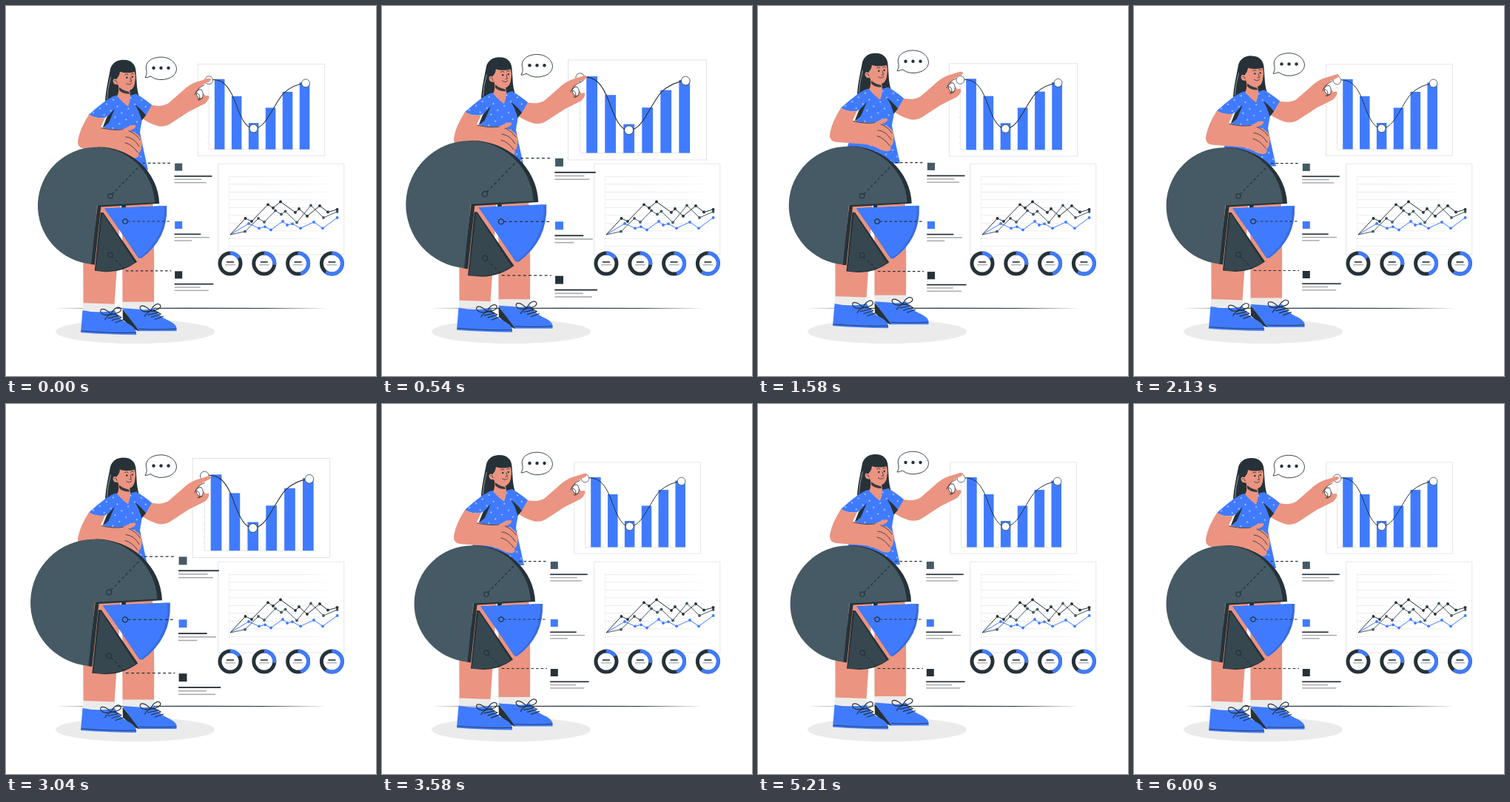
These frames come from a looping animation (500 by 500 pixels, 6.04 s). An HTML page:

```html
<!DOCTYPE html>
<html lang="en">
<head>
<meta charset="utf-8">
<title>Data report</title>
<style>
html, body { margin: 0; width: 100%; height: 100%; overflow: hidden; background: #fff; }
svg { display: block; width: 100vw; height: 100vh; }
.ink { fill: none; stroke: #263238; stroke-linecap: round; stroke-linejoin: round; }
.dark { fill: #263238; }
.blue { fill: #407bff; }
.slate { fill: #455a64; }
.skin { fill: #eb9481; }
.sock { fill: #ebebeb; }
.panel { fill: #fff; stroke: #e3e3e3; stroke-width: .9; }
.dash { stroke-dasharray: 3.6 3; stroke-linecap: butt; }
</style>
</head>
<body>
<svg viewBox="0 0 500 500">
  <defs>
    <pattern id="dots" width="15" height="15" patternUnits="userSpaceOnUse" patternTransform="rotate(12)">
      <g fill="#fff"><circle cx="3" cy="4" r=".85"/><circle cx="10.5" cy="11.5" r=".85"/></g>
    </pattern>
    <linearGradient id="fade">
      <stop offset="0" stop-color="#e4e4e4"/><stop offset=".75" stop-color="#e9e9e9"/><stop offset="1" stop-color="#fff"/>
    </linearGradient>
    <g id="laces" class="ink" stroke-width="1.2">
      <path d="M142 417C133 407 126 409 128 414C131 419 137 418 142 417C145 409 152 405 155 409C157 414 149 416 142 417"/>
      <path d="M142 417Q136 419 134 424M142 417Q150 416 155 421M138 422L152 419M143 425L156 421M148 428L159 424"/>
    </g>
    <path id="dress" d="M149 121C140 123 128 133 112 147Q122 153 134 151L137 149L131 168L119 205L119 222H192Q187 200 181 171L184 153L189 148L197 134Q189 127 176 119L168 121Q164 126 159 125Q152 124 149 121Z"/>
  </defs>

  <ellipse cx="174.5" cy="440" rx="107.5" ry="16.3" fill="#ebebeb"/>
  <path class="dark" d="M66 408.4Q250 407.2 434 408.4Q250 409.6 66 408.4Z"/>
  <g id="lineChart"></g>
  <g id="barChart"></g>

  <g id="woman">
    <path class="skin" d="M104 250H156L150 352L146.500 404H104.500Z"/>
    <path class="skin" d="M157 250H197Q201 300 200 402H157.500Z"/>
    <path class="dark" d="M156 255H163L161 283L156 290Z"/>
    <path class="sock" d="M104 401.500L147.500 403L147 412.500H103.500ZM157.500 400H200V410H157.500Z"/>

    <path class="blue" d="M157.500 408.500L179 410Q189 412 200 408.500Q205 418 217 424Q229 429 230.500 435V439.500H178Z"/>
    <path class="dark" d="M157.500 409.500L180 439.500L172 437L158 424Z"/>
    <path class="ink" stroke-width=".8" d="M180 436.700Q208 438 230 436.500"/>
    <use href="#laces" x="53.500" y="-4.500"/>
    <path class="blue" d="M103.500 411.500Q126 416 147 411.500Q151 422 162 428Q175 434 176 441V444.500Q135 444 101 441.500Z"/>
    <path class="ink" stroke-width=".8" d="M102 439.300Q145 442.500 175.500 441.500"/>
    <use href="#laces"/>

    <path class="dark" d="M134 129C135 112 139 97 141 85C144 76 152 72.500 159 73C169 73 175 79 175.500 88L177 109Q178 117 179.500 121Q172 126 164 123L146 125Q139 125 134 129Z"/>
    <path fill="none" stroke="#fff" stroke-width=".5" d="M136.500 126Q137 112 141.500 96"/>
    <path class="skin" d="M184 152Q192 140 196 134Q210 137 219 132Q233 120 243 111Q253 103 262 101.500L273 98Q277 97.500 277 100Q276 102.500 268 105.500Q262 109 261 112Q267 119 270 122Q272 120.500 274 121.500Q275.500 126 269 132Q257 138 247 143L224 158Q213 166 201 161Q190 157 184 152Z"/>
    <path d="M257 117Q260 112 264 113Q268 119 265 125Q258 127 257 117Z" fill="#fff" stroke="#263238" stroke-width=".8"/>
    <path class="ink" stroke-width=".8" d="M255 120Q258 111 268 107M258 118Q264 120 261 127M265 125Q262 128 259 127"/>

    <use href="#dress" class="blue"/>
    <use href="#dress" fill="url(#dots)"/>
    <path class="dark" d="M174 133Q184 141 189 148L183.500 155Q180 142 174 133ZM147 139L136 151L130.500 165L139 158Z"/>
    <path class="skin" d="M150 105L167 113L168 121Q168 129 165 136Q158 131 150 122Q153 118 152 108Z"/>
    <path class="dark" d="M153 110Q159 115 166 116L167 119Q157 119 153 114Z" opacity=".9"/>
    <path class="skin" d="M150 89Q161 87 173 88Q176 94 174.500 101Q174 111 168 114Q158 115 152 106Q145 108 144.500 101Q145 97 150 99Z"/>
    <path class="dark" d="M148 99Q153 97 154 89Q163 92 174.500 89Q173 78 162 77L149 82L143 96Z"/>
    <path class="ink" stroke-width=".8" d="M146.500 101Q149 99.500 150 104M160.500 93Q163 91 165 93M168.500 92.500Q171 90 172.500 92M168 97L169.500 102L167 102.500M162.500 105Q167 108 170 104.500"/>
    <circle class="dark" cx="163.300" cy="97" r="1.2"/><circle class="dark" cx="170.700" cy="96" r="1.2"/>

    <path class="skin" d="M112 147Q123 153 134 151L128 164Q147 169 160 166Q168 161 174 161Q177 163 173 166L167 169Q176 171 181 177Q185 183 183 190Q183 197 179 199Q181 204 176 205.500Q169 206 161 201Q149 195 131 195L105 193Q95 191 97.500 180Q100 166 112 147Z"/>
    <path class="ink" stroke-width=".8" d="M129 165Q146 169 158 167M166 169Q176 173 181 181M162 177Q173 178 180 190M161 185Q170 187 178 198"/>

    <path d="M188 97Q191 92 190 88C185 72 206 66 219 71C233 77 235 92 220 98Q206 103 195 95Q192 97 188 97Z" fill="#fff" stroke="#263238" stroke-width=".9"/>
    <g class="dark"><circle cx="199.500" cy="84" r="2.200"/><circle cx="209.500" cy="84" r="2.200"/><circle cx="219.500" cy="84" r="2.200"/></g>
  </g>

  <g id="pie">
    <path class="dark" d="M124 191A82 79 0 0 1 207 267L128.500 271.500L120 349.500L114 348.500L124 270Z"/>
    <path class="slate" d="M123.500 269.500L201 265.500A78.800 78.800 0 1 0 115.500 348.500Z"/>
    <path class="dark" d="M128 279H131.500L177 345.500Q157 360 134 358.800L120 357.500Z"/>
    <path fill="#37474f" d="M130.500 280L174 346.500Q151 361 121.500 357Z"/>
    <path fill="#386ce0" d="M134 273.500L217 270Q219 314 183 340.500L179 340.500Z"/>
    <path class="blue" d="M133 273.500L213.500 270Q216 312 180 340.500Z"/>
    <g class="ink" stroke-width="1.2">
      <circle cx="141" cy="257" r="3.200"/><circle cx="161" cy="291" r="3.200"/><circle cx="141" cy="336" r="3.200"/>
      <path class="dash" d="M143.300 254.700L184 212.700H223M164.200 291H223M143.300 338.300L163 357.500H223"/>
    </g>
  </g>
</svg>
<script>
const LOOP = 6040, CYCLE = 6000, LEAD = 30;
const INK = '#263238', SLATE = '#455a64', BLUE = '#407bff';
const $ = id => document.getElementById(id);

function add(parent, tag, attrs) {
  const el = document.createElementNS('http://www.w3.org/2000/svg', tag);
  for (const key in attrs) el.setAttribute(key, attrs[key]);
  parent.appendChild(el);
  return el;
}
const rect = (parent, x, y, width, height, attrs) => add(parent, 'rect', { x, y, width, height, ...attrs });
const disc = (parent, cx, cy, r, attrs) => add(parent, 'circle', { cx, cy, r, ...attrs });
const bar = (parent, x, y, width, height, fill) => rect(parent, x, y - height / 2, width, height, { fill });

function buildBarChart(g) {
  rect(g, 259.7, 78.8, 170.6, 123.3, { class: 'panel' });
  add(g, 'path', { d: 'M274.5 105V193.500H411', fill: 'none', stroke: '#dedede', 'stroke-width': .7 });
  for (let y = 110; y < 193; y += 8.3) bar(g, 272.5, y, 2, .6, '#dedede');
  [99, 122, 158, 137.5, 116, 103.5].forEach((top, i) =>
    rect(g, 282.2 + i * 22.85, top, 13.5, 193.5 - top, { fill: BLUE }));
  add(g, 'path', {
    class: 'ink', 'stroke-width': 1,
    d: 'M274.500 100.300C293 97 302 109 310 130C317 150 324 165.500 334.500 165.500C352 165.500 360 135 375 118Q388 106 404.500 104.500'
  });
  [[274.5, 100.5], [334.6, 165.4], [404.6, 104.5]].forEach(([x, y]) =>
    disc(g, x, y, 5.4, { fill: '#fff', stroke: INK, 'stroke-width': .7 }));
}

function buildLineChart(g) {
  rect(g, 286.8, 213.2, 170, 122.8, { class: 'panel' });
  for (let i = 0; i < 10; i++) rect(g, 302, 230 + i * 10.5, 140, .7, { fill: 'url(#fade)' });
  rect(g, 301.3, 228, .7, 108, { fill: '#ececec' });
  const series = [
    [BLUE, [[328, 294], [342, 300.3], [350, 298.3], [358, 302.5], [374, 291], [380, 296], [387, 294.3], [398, 300.3], [416, 292], [428, 300.3], [447.6, 286]]],
    [SLATE, [[323, 304.7], [341, 287], [349, 292], [364, 276.5], [372, 281.5], [377.5, 277.5], [393, 292.5], [412, 269.5], [429, 286], [447.6, 278]]],
    [INK, [[323.5, 287], [332, 291], [354, 268.3], [361, 273], [371, 264.5], [391, 279], [396, 274], [407, 284], [424, 270], [435, 278.5], [447.6, 275]]]
  ];
  for (const [color, points] of series) {
    add(g, 'polyline', { points: '303,309 ' + points.join(' '), fill: 'none', stroke: color, 'stroke-width': 1 });
    points.forEach(([x, y]) => disc(g, x, y, 1.9, { fill: color }));
  }
  [.16, .27, .46, .6].forEach((share, i) => {
    const x = 303 + i * 45.8, y = 348, r = 14;
    disc(g, x, y, r, { fill: '#fff', stroke: INK, 'stroke-width': 5 });
    disc(g, x, y, r, {
      fill: 'none', stroke: BLUE, 'stroke-width': 5, pathLength: 1,
      'stroke-dasharray': `${share} 1`, transform: `rotate(-90 ${x} ${y})`
    });
    bar(g, x - 5, 346, 10, 1.6, INK);
    bar(g, x - 7, 349.8, 14, 1.2, '#a6a6a6');
  });
}

function buildLegend(g) {
  const items = [[SLATE, 213, 50.5, 36.5, 43], [BLUE, 291, 35.5, 47, 23.5], [INK, 358, 52.5, 35, 46]];
  for (const [color, y, ...widths] of items) {
    rect(g, 227.8, y, 10, 10, { fill: color });
    widths.forEach((w, i) => bar(g, 227.2, y + 17.3 + i * 4.3, w, i ? 1.4 : 1.7, i ? '#a6a6a6' : INK));
  }
}

// Two beats per cycle, linear between the stops.
const BEATS = [[0, 1], [.1, 1.1], [.3, 1], [.4, 1], [.5, 1.1], [.6, 1], [1, 1]];
function beat(p) {
  const i = Math.max(1, BEATS.findIndex(stop => stop[0] >= p));
  const [p0, s0] = BEATS[i - 1], [p1, s1] = BEATS[i];
  return s0 + (s1 - s0) * (p - p0) / (p1 - p0);
}
const scaleAbout = (x, y, s) => `translate(${x} ${y}) scale(${s}) translate(${-x} ${-y})`;

function draw(t) {
  const time = Math.min(t + LEAD, CYCLE);
  const s = beat(time / CYCLE);
  const lift = 10 * (1 - Math.abs(time % 3000 / 1500 - 1));
  $('woman').setAttribute('transform', `translate(0 ${-lift})`);
  $('pie').setAttribute('transform', scaleAbout(162, 287.5, s));
  $('barChart').setAttribute('transform', scaleAbout(344.9, 140.4, s));
}

buildBarChart($('barChart'));
buildLineChart($('lineChart'));
buildLegend($('pie'));

const start = performance.now();
function tick() {
  draw((performance.now() - start) % LOOP);
  requestAnimationFrame(tick);
}
tick();
</script>
</body>
</html>
```
